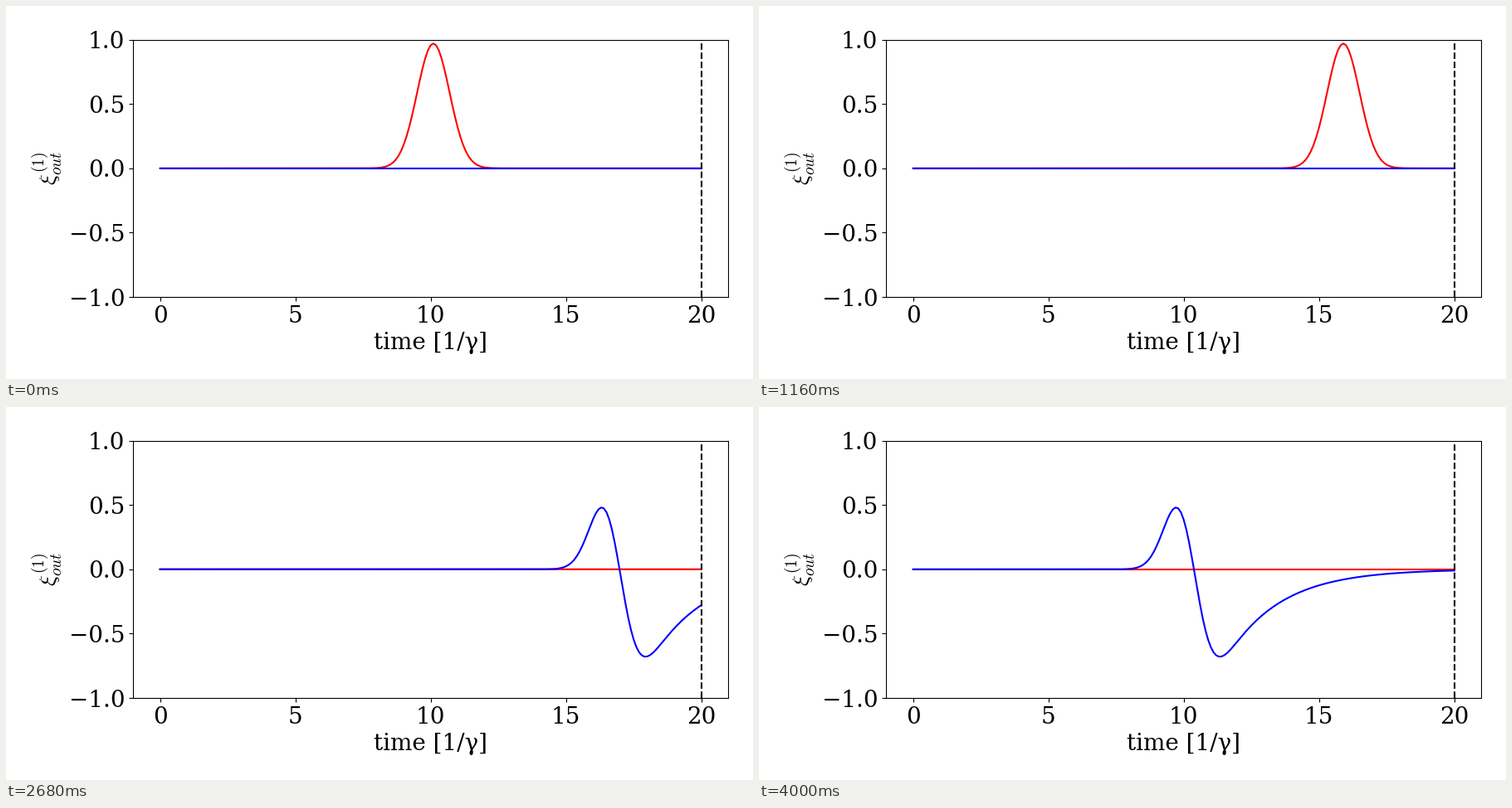
Write a matplotlib script that moves like this. It is 900x450 px and loops after 4020 ms.

```python
import math

import matplotlib.pyplot as plt
import numpy as np
from matplotlib.animation import FuncAnimation

plt.rcParams.update({
    "font.family": "DejaVu Serif",
    "font.size": 20,
    "mathtext.fontset": "cm",
})

FRAMES = 201
DT = 0.1
T_END = 20.0
A = 2 * math.log(2)                               # pulse of unit FWHM
AMP = math.sqrt(2) * (math.log(2) / math.pi) ** 0.25
SIGMA = math.sqrt(1 / (2 * A))
K = 0.5                                           # gamma / 2
SETTLED = 180                                     # input line has fully gone flat

erfc = np.vectorize(math.erfc)
t = np.linspace(0, T_END, 201)


def pulse(u):
    return AMP * np.exp(-A * u ** 2)


def scattered(u):
    """Input pulse minus the field re-emitted by the decaying emitter."""
    area = AMP * math.sqrt(2 * math.pi) * SIGMA
    cdf = 0.5 * erfc(-(u / SIGMA - K * SIGMA) / math.sqrt(2))
    return pulse(u) - area * np.exp(-K * u + (K * SIGMA) ** 2 / 2) * cdf


fig, ax = plt.subplots(figsize=(9, 4.5), dpi=100)
fig.subplots_adjust(left=0.17, right=0.967, bottom=0.22, top=0.91)

line_in, = ax.plot(t, 0 * t, "r-", lw=1.5)
line_out, = ax.plot(t, 0 * t, "b-", lw=1.5)
ax.axvline(T_END, color="k", ls="--", lw=1.5)

ax.set_xlim(-1, 21)
ax.set_ylim(-1, 1)
ax.set_xticks([0, 5, 10, 15, 20])
ax.set_yticks([-1, -0.5, 0, 0.5, 1])
ax.set_xlabel("time [1/γ]")
ax.set_ylabel(r"$\xi_{out}^{(1)}$")


def update(i):
    line_in.set_ydata(pulse(t - 10.1 - i * DT))
    line_in.set_snap(i >= SETTLED)
    line_out.set_ydata(scattered(t - 30 + i * DT))
    return line_in, line_out


anim = FuncAnimation(fig, update, frames=FRAMES, interval=20,
                     repeat=True, repeat_delay=0, blit=False)
plt.show()
```
